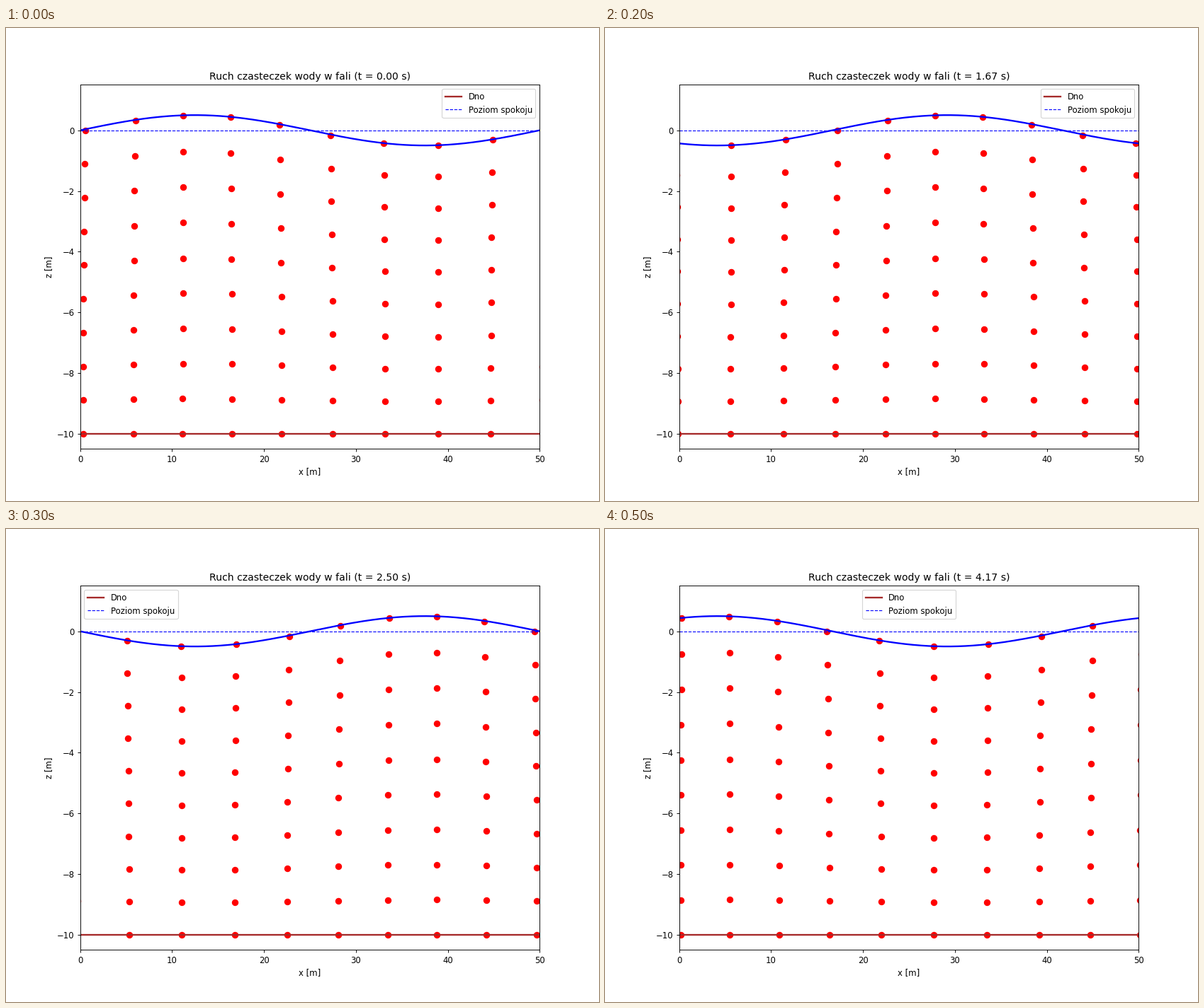
Recreate the animation shown at these times as a matplotlib script. Size 837 by 669 pixels, loop 0.6 s.

```python
import matplotlib.pyplot as plt
import numpy as np
from matplotlib.animation import FuncAnimation

WIDTH, HEIGHT, DPI = 837, 669, 83.7
FRAMES, INTERVAL = 6, 100

AMPLITUDE, LENGTH, PERIOD, DEPTH = 0.5, 50.0, 5.0, 10.0
K = 2 * np.pi / LENGTH
OMEGA = 2 * np.pi / PERIOD

# The small margin keeps the pixel size from rounding down.
fig, ax = plt.subplots(
    figsize=((WIDTH + 1e-6) / DPI, (HEIGHT + 1e-6) / DPI), dpi=DPI
)

x = np.linspace(0, LENGTH, 500)
x0, z0 = np.meshgrid(np.linspace(0, LENGTH, 10), np.linspace(-DEPTH, 0, 10))


def surface(t):
    return AMPLITUDE * np.sin(K * x - OMEGA * t)


def particles(t):
    """Elliptical orbits of linear waves in water of finite depth."""
    phase = K * x0 - OMEGA * t
    height = K * (z0 + DEPTH)
    scale = AMPLITUDE / np.sinh(K * DEPTH)
    px = x0 + scale * np.cosh(height) * np.cos(phase)
    pz = z0 + scale * np.sinh(height) * np.sin(phase)
    return np.column_stack([px.ravel(), pz.ravel()])


wave, = ax.plot(x, surface(0), color="blue", linewidth=2)
dots = ax.scatter(*particles(0).T, color="red", s=50)
ax.axhline(-DEPTH, color="brown", linewidth=2, label="Dno")
ax.axhline(0, color="blue", linestyle="--", linewidth=1, label="Poziom spokoju")
ax.set_xlim(0, LENGTH)
ax.set_ylim(-DEPTH - 0.5, 1.5)
ax.set_xlabel("x [m]")
ax.set_ylabel("z [m]")
ax.legend(loc="best")


def update(frame):
    t = PERIOD * frame / FRAMES
    wave.set_ydata(surface(t))
    dots.set_offsets(particles(t))
    ax.set_title(f"Ruch czasteczek wody w fali (t = {t:.2f} s)")
    return wave, dots


animation = FuncAnimation(
    fig, update, frames=FRAMES, interval=INTERVAL, repeat=True, repeat_delay=0
)
plt.show()
```
